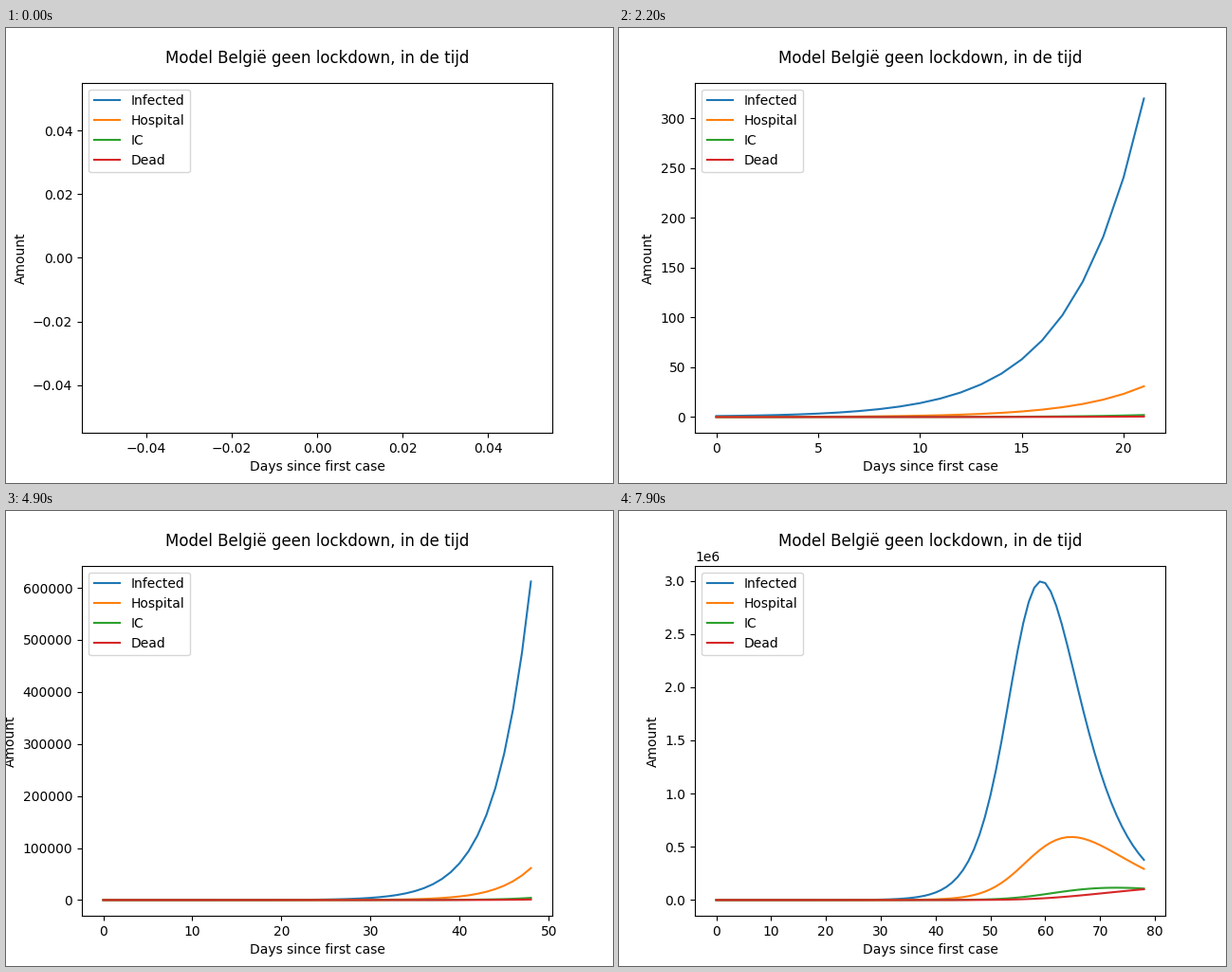
Recreate the animation shown at these times as a matplotlib script. Size 640 px wide and 480 px high, loop 8000 ms.

```python
import numpy as np
import matplotlib.pyplot as plt
from matplotlib.animation import FuncAnimation

DAYS = 80
STEPS = 10  # integration steps per day

POPULATION = 17.27e6
SPREAD, RECOVERY = 0.54, 0.255  # daily infection and recovery rates
ISOLATED_RECOVERY = 0.15
ADMISSION, DISCHARGE = 0.041, 0.14
CROWDING = 23e6  # admissions slow down as infections near this
TO_CARE, FROM_CARE = 0.0247, 0.093
HOSPITAL_DEATH, CARE_DEATH = 0.00206, 0.0367


def flow(state):
    healthy, spreading, isolated, hospital, care, dead = state
    infected = spreading + isolated
    new = SPREAD * spreading * healthy / POPULATION
    admitted = ADMISSION * infected * (1 - infected / CROWDING)
    return np.array([
        -new,
        new - RECOVERY * spreading,
        -ISOLATED_RECOVERY * isolated,
        admitted - DISCHARGE * hospital,
        TO_CARE * hospital - FROM_CARE * care,
        HOSPITAL_DEATH * hospital + CARE_DEATH * care,
    ])


def advance(state, dt):
    """One fourth-order Runge-Kutta step."""
    k1 = flow(state)
    k2 = flow(state + dt / 2 * k1)
    k3 = flow(state + dt / 2 * k2)
    k4 = flow(state + dt * k3)
    return state + dt / 6 * (k1 + 2 * k2 + 2 * k3 + k4)


def simulate():
    state = np.array([POPULATION, 0.805, 0.195, 0, 0, 0])
    daily = []
    for _ in range(DAYS):
        daily.append(state)
        for _ in range(STEPS):
            state = advance(state, 1 / STEPS)
    _, spreading, isolated, hospital, care, dead = np.array(daily).T
    return spreading + isolated, hospital, care, dead


series = simulate()
days = np.arange(DAYS)

fig, ax = plt.subplots(figsize=(6.4, 4.8), dpi=100)
lines = [ax.plot([], [], label=name)[0]
         for name in ("Infected", "Hospital", "IC", "Dead")]
ax.set_title("Model België geen lockdown, in de tijd", pad=15)
ax.set_xlabel("Days since first case")
ax.set_ylabel("Amount")
ax.legend(loc="upper left")


def update(n):
    for line, values in zip(lines, series):
        line.set_data(days[:n], values[:n])
    ax.relim()
    ax.autoscale_view()
    return lines


anim = FuncAnimation(fig, update, frames=DAYS, interval=100,
                     init_func=lambda: update(0), repeat=True, repeat_delay=0)
plt.show()
```
